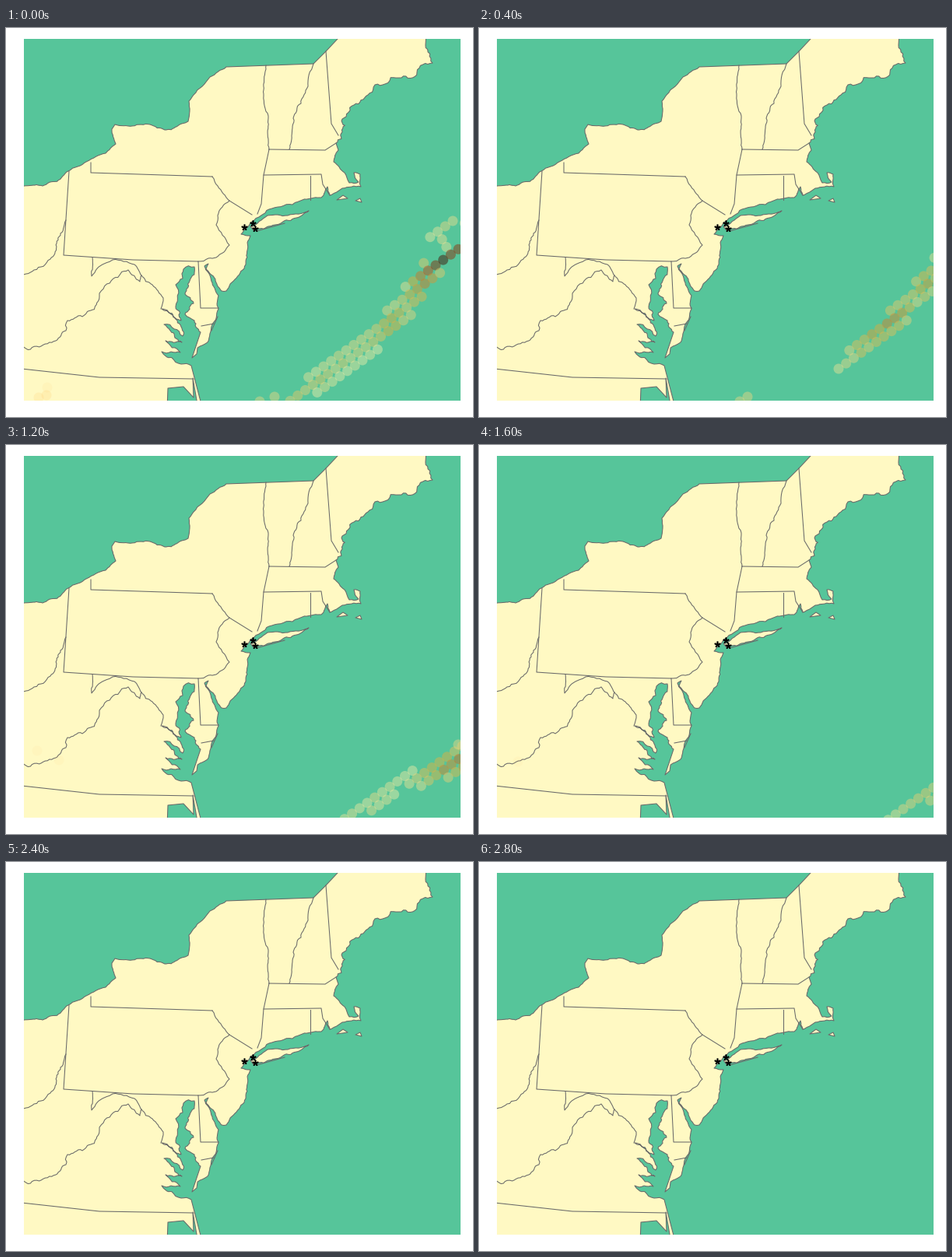
Recreate the animation shown at these times as a matplotlib script. Size 600 by 500 pixels, loop 3.2 s.

```python
import numpy as np
import matplotlib.pyplot as plt
from matplotlib.animation import FuncAnimation
from matplotlib.patches import Polygon, Rectangle

W, H, DPI = 600, 500, 100
SEA, LAND, LINE = "#56c59a", "#fff9c3", "#696969"
LEFT, TOP, RIGHT, BOTTOM = 23, 14, 584, 479

fig = plt.figure(figsize=(W / DPI, H / DPI), dpi=DPI, facecolor="white")
ax = fig.add_axes([0, 0, 1, 1])
ax.set(xlim=(0, W), ylim=(H, 0))
ax.axis("off")
frame_box = Rectangle((LEFT, TOP), RIGHT - LEFT, BOTTOM - TOP, fc=SEA, lw=0)
ax.add_patch(frame_box)
rng = np.random.default_rng(4)


def split(p, q, amp):
    """Midpoint displacement between p and q, without q."""
    d = q - p
    size = np.hypot(*d)
    if size < 4:
        return [p]
    shift = np.clip(rng.normal(0, amp), -0.2, 0.2)
    mid = (p + q) / 2 + shift * np.array([-d[1], d[0]])
    return split(p, mid, amp) + split(mid, q, amp)


def rough(points, amp):
    pts = np.array(points, float)
    out = []
    for p, q in zip(pts, pts[1:]):
        out += split(p, q, amp)
    return out + [pts[-1]]


def land(points):
    shape = Polygon(points, closed=True, fc=LAND, ec=LINE, lw=0.75, joinstyle="round")
    ax.add_patch(shape)
    shape.set_clip_path(frame_box)


def border(points, amp=0):
    line, = ax.plot(*zip(*rough(points, amp)), color=LINE, lw=0.75)
    line.set_clip_path(frame_box)


lakes = [(15, 204), (47, 203), (80, 184), (128, 161), (141, 149), (136, 130),
         (140, 124), (185, 124), (204, 131), (234, 120), (235, 94), (241, 86),
         (262, 63), (283, 50)]
north = [(395, 46), (411, 30), (426, 14), (428, 6), (540, 6)]
maine = [(539, 22), (548, 45), (528, 57), (508, 64), (484, 73), (465, 86), (447, 99),
         (432, 117), (424, 148)]
cape = [(427, 157), (421, 172), (435, 186), (441, 199), (453, 198), (447, 186),
        (455, 188), (456, 204), (432, 206), (416, 215), (413, 204), (405, 218),
        (368, 227), (338, 233), (316, 249), (302, 265), (314, 267), (308, 304),
        (283, 338), (277, 338), (257, 310), (260, 303), (255, 306), (273, 344),
        (273, 361), (259, 404), (239, 424)]
bay = [(250, 391), (242, 376), (230, 368), (241, 354), (230, 342), (236, 325),
       (242, 307), (228, 310), (218, 330), (218, 358), (225, 376), (200, 361),
       (226, 386), (227, 396), (203, 381), (226, 404), (205, 402), (224, 417),
       (200, 416), (225, 432), (238, 434)]
south = [(250, 480), (247, 490), (240, 450), (241, 475), (228, 461), (208, 463),
         (207, 490), (15, 490)]
land(rough(lakes, .05) + north + rough(maine, .3) + rough(cape, .06)
     + rough(bay, .13) + south)
land(rough([(314, 255), (336, 241), (362, 241), (389, 235), (351, 252), (318, 260)], .06))
land([(425, 221), (433, 215), (439, 219)])
land([(449, 222), (455, 219), (457, 224)])
border([(322, 261), (358, 251)])
border([(272, 371), (264, 389)])

# State lines: surveyed ones are straight, river ones are rough
border([(81, 184), (74, 292), (163, 298), (247, 300), (250, 360), (273, 360)])
border([(109, 173), (109, 186), (265, 191)])
border([(265, 191), (272, 203), (287, 222), (272, 241), (270, 253), (287, 279),
        (270, 295), (260, 296), (247, 300)], .06)
border([(287, 222), (316, 240)])
border([(251, 383), (267, 380)])
border([(77, 247), (70, 264), (57, 297), (36, 311), (20, 318)], .12)
border([(111, 295), (110, 319), (137, 298), (165, 304), (174, 318), (188, 330),
        (202, 347), (199, 361)], .06)
border([(174, 318), (172, 326), (157, 311), (138, 322), (120, 345), (98, 371),
        (79, 376), (77, 389), (64, 402), (20, 410)], .1)
border([(20, 438), (120, 449), (241, 451)])
border([(334, 48), (331, 87), (337, 113), (338, 156)], .05)
border([(338, 156), (331, 189), (328, 226), (323, 239)])
border([(395, 46), (388, 75), (379, 97), (369, 116), (364, 156)], .06)
border([(338, 156), (410, 157), (424, 148)])
border([(411, 30), (418, 123), (427, 138)])
border([(331, 189), (405, 188), (407, 201), (416, 215)])
border([(391, 190), (391, 221)])

ax.plot([306, 317, 320], [255.5, 251, 257.5], ls="", marker=(5, 2, 0), ms=5.6,
        mec="black", mew=1.2, zorder=5)

# Bands by stage: points of (x, y, half width, strength)
BANDS = {
    0: [[(364, 476, 6, .3), (400, 455, 13, .2), (465, 404, 15, .15), (492, 382, 15, .45),
         (514, 357, 15, .25), (542, 314, 14, .8), (565, 293, 6, 1), (588, 278, 7, .75)],
        [(546, 270, 5, .1), (574, 249, 6, .1), (588, 254, 6, .1)],
        [(560, 268, 4, .1), (569, 281, 4, .15)]],
    1: [[(462, 438, 4, .05), (488, 412, 10, .35), (533, 376, 14, .55),
         (558, 348, 14, .25), (574, 328, 15, .5), (590, 308, 14, .2)]],
    2: [[(476, 466, 5, .1), (499, 442, 11, .45), (518, 425, 12, .25),
         (525, 407, 10, .1), (566, 386, 9, .45), (588, 382, 9, .1)]],
    3: [[(434, 479, 5, .05), (470, 464, 8, .15), (507, 430, 9, .05),
         (533, 428, 11, .25), (557, 418, 13, .55), (588, 402, 16, .65)]],
    4: [[(520, 481, 6, .05), (588, 444, 10, .3)]],
}
# Lone dots over the sea, and weak dots over the land as (x, y, alpha)
LONE = {0: [(326, 480), (345, 474)], 1: [(345, 474), (335, 480)], 2: [(396, 481)],
        3: [(581, 385)]}
FAINT = {0: [(42, 475, .2), (53, 462, .1), (52, 472, .22)],
         2: [(47, 417, .22), (57, 417, .3), (57, 427, .25), (75, 428, .08), (28, 472, .4),
             (30, 407, .12)],
         3: [(40, 393, .07), (68, 405, .08)],
         4: [(50, 407, .07)],
         5: [(59, 408, .12), (105, 460, .13), (109, 471, .13), (119, 471, .13)]}
ANCHORS = [(574, 248), (462, 438), (557, 382), (539, 448), (545, 468)]
STEP_A, STEP_B = np.array([9.7, -6.9]), np.array([5.6, 9.8])

RAMP = np.array([(248, 241, 172), (222, 176, 62), (186, 84, 32), (62, 34, 20)]) / 255
WEAK = (1, .8, .43)


def shade(v):
    return [np.interp(v, [0, .4, .75, 1], c) for c in RAMP.T] + [.43 + .12 * v]


def measure(p, band):
    """Distance over half width, and strength, at the nearest point of a band."""
    best = (1e9, 1, 0)
    for a, b in zip(np.array(band, float), np.array(band[1:], float)):
        d = b - a
        t = np.clip(np.dot(p - a[:2], d[:2]) / np.dot(d[:2], d[:2]), 0, 1)
        q = a + d * t
        best = min(best, (np.hypot(*(p - q[:2])), q[2], q[3]))
    return best[0] / best[1], best[2]


def make_dots(k):
    noise = np.random.default_rng(20 + k)
    places, colors = [], []
    if k in BANDS:
        for m, n in np.ndindex(150, 90):
            p = ANCHORS[k] + (m - 75) * STEP_A + (n - 45) * STEP_B
            if not (310 < p[0] < 592 and 235 < p[1] < 487):
                continue
            r, v = min(measure(p, b) for b in BANDS[k])
            if r <= 1:
                v = v * (1 - .75 * r * r) + noise.uniform(-.06, .06)
                places.append(p)
                colors.append(shade(np.clip(v, 0, 1)))
    for p in LONE.get(k, []):
        places.append(p)
        colors.append(shade(.15))
    for x, y, alpha in FAINT.get(k, []):
        places.append((x, y))
        colors.append([*WEAK, alpha])
    return np.array(places).reshape(-1, 2), np.array(colors).reshape(-1, 4)


STAGES = [make_dots(k) for k in range(8)]
dots = ax.scatter([], [], s=(13 * 72 / DPI) ** 2, linewidths=0, zorder=4)
dots.set_clip_path(frame_box)


def update(k):
    places, colors = STAGES[k]
    dots.set_offsets(places)
    dots.set_facecolors(colors)
    return dots,


anim = FuncAnimation(fig, update, frames=8, interval=400, repeat=True, repeat_delay=0)
plt.show()
```
